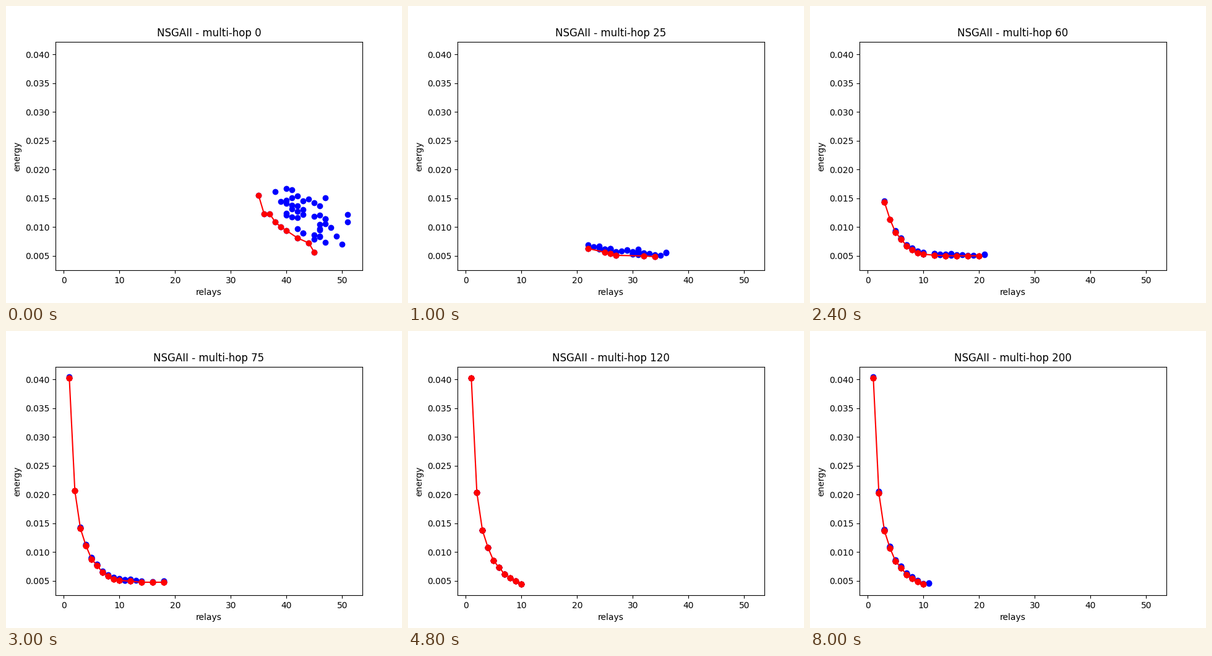
These frames come from a looping animation (640 px wide and 480 px high, 8200 ms). A matplotlib script:

```python
import numpy as np
import matplotlib.pyplot as plt
from matplotlib.animation import FuncAnimation

STEPS, STEP_MS, GENS_PER_STEP = 41, 200, 5
SETTLE, LAST_MUTANTS = 12, 37  # steps
UNIT = 1e-4                    # energies below are given in this unit

# Early Pareto fronts as a few (relays, energy) key points
EARLY = {
    0: [(35, 155), (36, 122.5), (37, 122.5), (38, 109), (39, 100), (40, 94),
        (42, 81), (44, 72.5), (45, 56.3)],
    5: [(22, 62.8), (25, 56.3), (26, 54), (27, 51), (32, 50), (34, 48.8)],
    9: [(10, 81), (11, 80), (13, 78.5), (14, 60.6), (17, 51), (20, 50.7),
        (21, 47), (23, 44.5)],
}
# Best energy for 1 to 10 relays
BEST = [403, 202.5, 137, 107, 84, 72.5, 60.6, 54, 49, 43.7]

rng = np.random.default_rng(3)
place = rng.beta(2.5, 2.5, 44)
place = (place - place.min()) / np.ptp(place)
excess = rng.beta(2, 2.4, place.size)


def late_front(step):
    """Front creeping towards BEST while its long tail is cut off."""
    lo = max(1, 15 - step)
    hi = np.interp(step, [12, 15, 19], [20, 18, 10])
    relays = np.append(np.arange(lo, 11), np.arange(12, hi + 0.5, 2))
    lag = 4 * np.exp((15 - step) / 6) * (relays > 1)
    energy = np.interp(relays, range(1, 11), BEST) + lag
    tail = 44 + 0.9 * (hi - relays)
    return np.column_stack([relays, np.maximum(energy, tail)])


def blend(a, b, t):
    """Mix two fronts; relays stay whole, energy follows a 1/relays law."""
    n = max(len(a), len(b))
    a, b = (p[np.rint(np.linspace(0, len(p) - 1, n)).astype(int)] for p in (a, b))
    mix = lambda p, q: p + (q - p) * t
    relays = np.rint(mix(a[:, 0], b[:, 0]))
    return np.column_stack([relays, mix(a.prod(axis=1), b.prod(axis=1)) / relays])


def pareto(points):
    kept = []
    for r, e in points[np.lexsort((points[:, 1], points[:, 0]))]:
        if not kept or (r > kept[-1][0] and e <= kept[-1][1]):
            kept.append((r, e))
    return np.array(kept)


def front_at(step):
    if step >= SETTLE:
        return late_front(step)
    k0 = max(k for k in EARLY if k <= step)
    k1 = min([k for k in EARLY if k > step], default=SETTLE)
    start = np.array(EARLY[k0], float)
    end = np.array(EARLY[k1], float) if k1 in EARLY else late_front(k1)
    return pareto(blend(start, end, (step - k0) / (k1 - k0)))


def cloud_at(step, front):
    """Dominated solutions: scattered above the front, closing in on it."""
    lo = np.interp(step, [0, 5, 9, 12, 14], [38, 22, 11, 3, 1])
    hi = np.interp(step, [0, 5, 9, 12, 15, 19, 36, 40],
                   [51, 36, 26, 21, 18, 10, 10, 11])
    spread = 100 * np.exp(-step / 2) + 4 * (step < 19 or step >= LAST_MUTANTS)
    relays = np.maximum(np.rint(lo + (hi - lo) * place), front[0, 0])
    energy = np.interp(relays, *front.T) + spread * excess
    return np.column_stack([relays, energy])


fig, ax = plt.subplots(figsize=(6.4, 4.8), dpi=100)
ax.set(xlim=(-1.478, 53.633), ylim=(0.002495, 0.042237),
       xlabel="relays", ylabel="energy")
title = ax.set_title("")
cloud = ax.scatter([], [], color="blue")
line, = ax.plot([], [], "o-", color="red")


def update(step):
    front = front_at(step)
    everyone = np.vstack([cloud_at(step, front), front])
    cloud.set_offsets(everyone * (1, UNIT))
    # copies of the best solutions pile up as the search converges
    copies = np.repeat(front, 1 + min(step, 15) // 5, axis=0)
    line.set_data(copies[:, 0], copies[:, 1] * UNIT)
    title.set_text(f"NSGAII - multi-hop {step * GENS_PER_STEP}")
    return cloud, line, title


anim = FuncAnimation(fig, update, frames=STEPS, interval=STEP_MS,
                     repeat=True, repeat_delay=0, blit=False)
plt.show()
```
